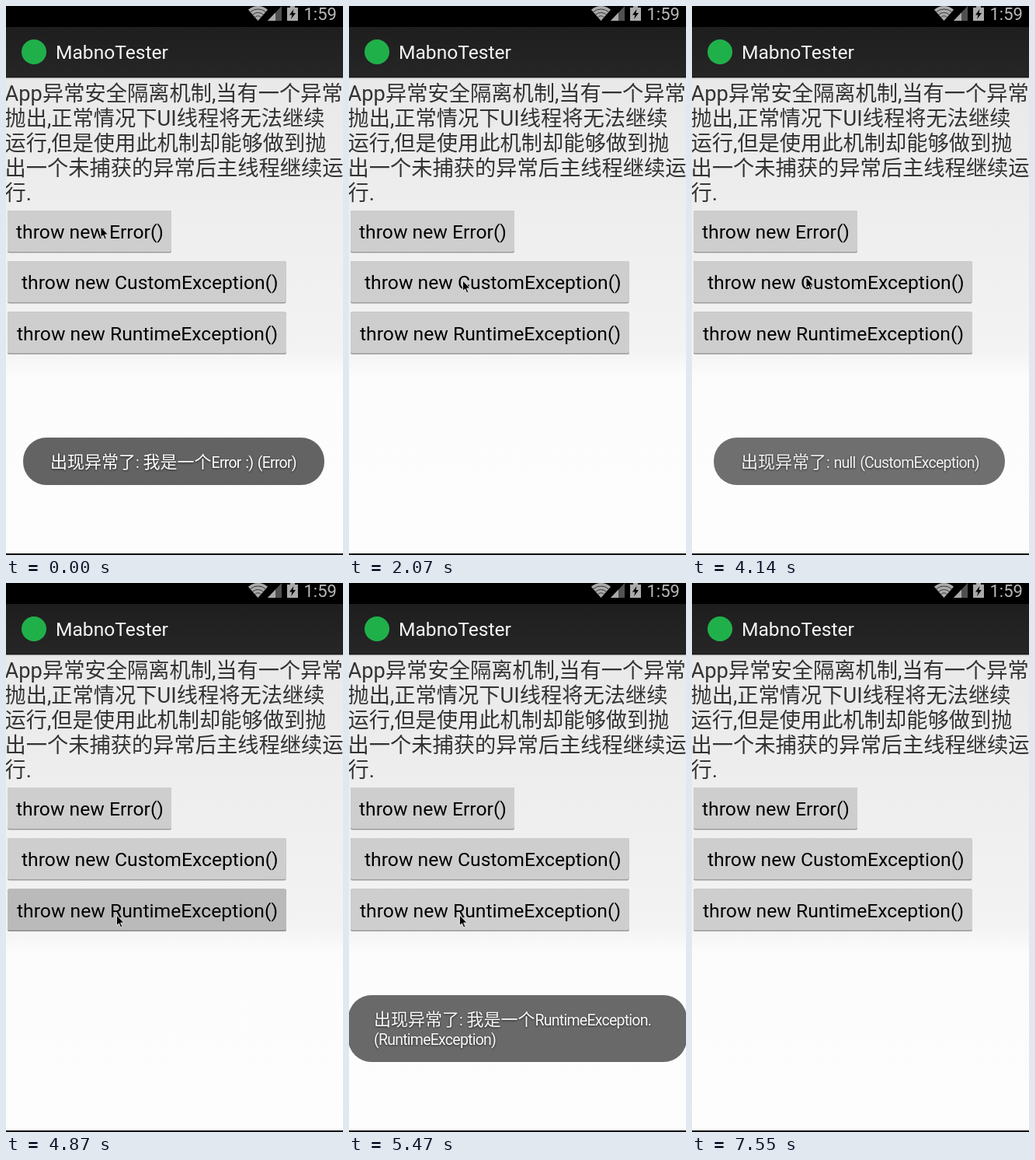
An HTML page with a canvas that plays this animation: 434x706 px, repeating every 8.25 s.

```html
<!DOCTYPE html>
<html lang="zh-CN">
<head>
<meta charset="utf-8">
<style>
  html, body { margin: 0; width: 100%; height: 100%; overflow: hidden; background: #000; }
  canvas { display: block; }
</style>
</head>
<body>
<canvas width="434" height="706"></canvas>
<script>
const ctx = document.querySelector('canvas').getContext('2d');
const LOOP = 8250, STEP = 148;
const FONT = "Roboto, 'Noto Sans CJK SC', 'Noto Sans CJK', sans-serif";
const clamp = v => Math.max(0, Math.min(1, v));

const INTRO = [
  'App异常安全隔离机制,当有一个异常',
  '抛出,正常情况下UI线程将无法继续',
  '运行,但是使用此机制却能够做到抛',
  '出一个未捕获的异常后主线程继续运',
  '行.'
];

const BUTTONS = [
  { y: 263, w: 211, textX: 13, label: 'throw new Error()' },
  { y: 328, w: 358.5, textX: 20, label: 'throw new CustomException()', pressed: 13 },
  { y: 393.5, w: 359, textX: 14, label: 'throw new RuntimeException()', pressed: 33 }
];

const TOASTS = [
  { x: 22, y: 555, w: 388, textX: 57, lines: ['出现异常了: 我是一个Error :) (Error)'], start: -900, end: 896 },
  { x: 28, y: 555, w: 375, textX: 63, lines: ['出现异常了: null (CustomException)'], start: 2080, end: 4004 },
  { x: -1, y: 530, w: 436, textX: 32, lines: ['出现异常了: 我是一个RuntimeException.', '(RuntimeException)'], start: 4916, end: 6970 }
];

// [step, x, y, glide]: glide means moving evenly from the previous key
const POINTER = [
  [0, 122, 284], [1, 121.5, 283], [4, 122.5, 283],
  [6, 122.5, 283], [11, 146.5, 353, true],
  [23, 146.5, 350], [26, 147, 349],
  [28, 147, 349], [32, 142.5, 427, true],
  [41, 142.5, 425], [45, 142.5, 425], [48, 486, 818, true]
];

function fill(color, x, y, w, h) {
  ctx.fillStyle = color;
  ctx.fillRect(x, y, w, h);
}

function roundBox(color, x, y, w, h, r) {
  ctx.fillStyle = color;
  ctx.beginPath();
  ctx.roundRect(x, y, w, h, r);
  ctx.fill();
}

function polygon(color, ...points) {
  ctx.fillStyle = color;
  ctx.beginPath();
  for (let i = 0; i < points.length; i += 2) ctx.lineTo(points[i], points[i + 1]);
  ctx.closePath();
  ctx.fill();
}

function text(str, x, y, size, color) {
  ctx.font = `${size}px ${FONT}`;
  ctx.fillStyle = color;
  ctx.fillText(str, x, y);
}

function gradient(y0, y1, ...stops) {
  const g = ctx.createLinearGradient(0, y0, 0, y1);
  stops.forEach(([at, color]) => g.addColorStop(at, color));
  return g;
}

function wifiArc(r) {
  ctx.beginPath();
  ctx.arc(324.5, 19, r, -Math.PI * 0.73, -Math.PI * 0.27);
}

function statusBar() {
  fill('#000', 0, 0, 434, 27);
  ctx.fillStyle = '#aaa';
  wifiArc(19);
  ctx.lineTo(324.5, 19);
  ctx.fill();
  ctx.strokeStyle = '#333';
  ctx.lineWidth = 1;
  for (const r of [6, 10.5, 15]) {
    wifiArc(r);
    ctx.stroke();
  }
  polygon('#505050', 337, 19, 355, 19, 355, 0);
  polygon('#aaa', 337, 19, 347, 19, 347, 8.5);
  fill('#aaa', 362, 2, 14, 17);
  fill('#aaa', 366, 0, 6, 2);
  polygon('#000', 370.5, 4, 365, 11.5, 368.5, 11.5, 367, 17, 373, 9, 369.5, 9);
  text('1:59', 383.5, 18, 22, '#b8b8b8');
}

function actionBar() {
  fill(gradient(27, 92, [0, '#1e1e1e'], [1, '#262626']), 0, 27, 434, 65);
  fill('#111', 0, 91, 434, 1);
  fill('#aaa', 0, 92, 434, 1);
  fill('#d8d8d8', 0, 93, 434, 1);
  ctx.fillStyle = '#20b04a';
  ctx.beginPath();
  ctx.arc(36, 59, 16, 0, Math.PI * 2);
  ctx.fill();
  text('MabnoTester', 64, 68, 24.6, '#f5f5f5');
}

function button({ y, w, textX, label, pressed }, step) {
  const down = step === pressed;
  roundBox(down ? '#8c8c8c' : '#9c9c9c', 2, y, w, 54.5, 2);
  roundBox(down ? '#bababa' : '#cecece', 2, y, w, 53, 2);
  text(label, textX, y + 36, 24.7, '#000');
}

// Latin runs are set smaller and tighter than the Chinese ones
function toastLine(line, x, y) {
  ctx.wordSpacing = '1.5px';
  for (const run of line.split(/([ -~]+)/)) {
    const latin = /^[ -~]/.test(run);
    ctx.letterSpacing = latin ? '-0.75px' : '0px';
    text(run, x, y, latin ? 19.5 : 22, '#fff');
    x += ctx.measureText(run).width;
  }
}

function toast({ x, y, w, textX, lines, start, end }, time) {
  const shown = 1 - (1 - clamp((time - start) / 700)) ** 2;
  const alpha = shown * (1 - clamp((time - end) / 500) ** 2);
  if (!alpha) return;
  ctx.save();
  ctx.globalAlpha = alpha;
  roundBox('#636363', x, y, w, 616 - y, 30);
  ctx.shadowColor = '#222';
  ctx.shadowBlur = 3;
  ctx.shadowOffsetY = 1;
  lines.forEach((line, i) => toastLine(line, textX, 594 - 25 * (lines.length - 1 - i)));
  ctx.restore();
}

function pointer(step) {
  const i = POINTER.findLastIndex(key => key[0] <= step);
  let [from, x, y] = POINTER[i];
  const next = POINTER[i + 1];
  if (next && next[3]) {
    const p = (step - from) / (next[0] - from);
    x += (next[1] - x) * p;
    y += (next[2] - y) * p;
  }
  ctx.save();
  ctx.translate(x, y);
  polygon('#000', 0, 0, 0, 13.5, 3, 10.8, 5.2, 16, 7.3, 15, 5.2, 10, 9.5, 10);
  ctx.strokeStyle = '#ddd';
  ctx.lineWidth = 1;
  ctx.stroke();
  ctx.restore();
}

function draw(now) {
  const step = Math.floor((now % LOOP + 16) / STEP);
  const time = step * STEP;
  fill(gradient(92, 704, [0, '#e9e9e9'], [0.57, '#f3f3f3'], [0.63, '#fcfcfc'], [1, '#fdfdfd']), 0, 92, 434, 612);
  statusBar();
  actionBar();
  INTRO.forEach((line, i) => text(line, -1.5, 121.5 + i * 32, 27.25, '#333'));
  BUTTONS.forEach(b => button(b, step));
  TOASTS.forEach(t => toast(t, time));
  pointer(step);
  fill('#000', 0, 704, 434, 2);
}

const begin = performance.now();
function frame() {
  draw(performance.now() - begin);
  requestAnimationFrame(frame);
}
frame();
</script>
</body>
</html>
```
